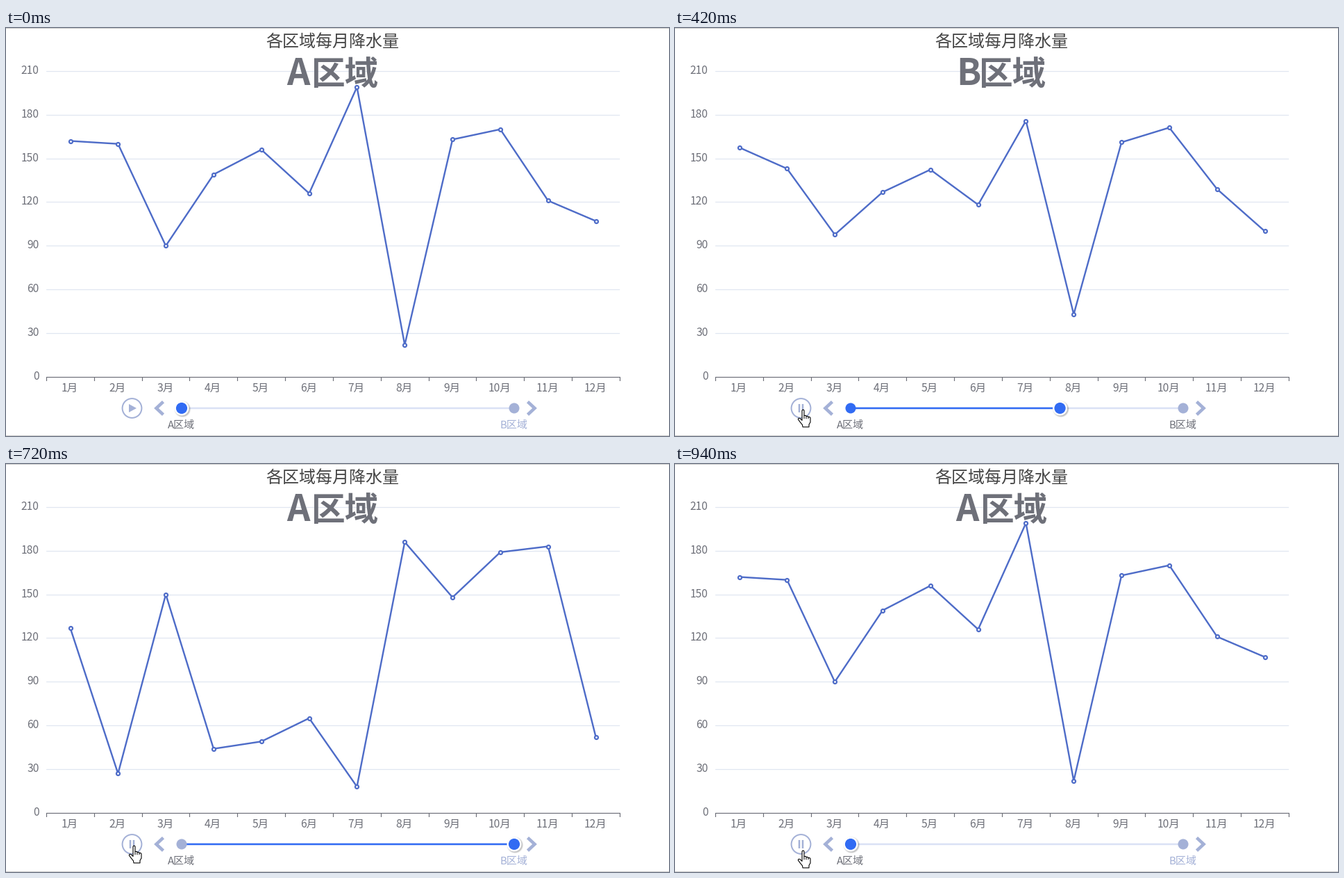
These frames come from a looping animation (955 px wide and 587 px high, 1200 ms). A matplotlib script:

```python
import matplotlib.pyplot as plt
import numpy as np
from matplotlib.animation import FuncAnimation
from matplotlib.patches import Circle, Polygon

W, H = 955, 587
STEP, LOOP = 20, 1200

GREY, TITLE = "#6E7079", "#464646"
LINE, PALE, BLUE, TRACK = "#4E6CC8", "#A4B1D7", "#316BF3", "#DAE1F5"

# Rainfall per month
AREA_A = np.array([162, 160, 90, 139, 156, 126, 199, 22, 163, 170, 121, 107])
AREA_B = np.array([127, 27, 150, 44, 49, 65, 18, 186, 148, 179, 183, 52])

# Times in ms
HAND_IN, PAUSE_AT = 140, 180
TO_B, TO_B_LENGTH = 380, 126
TO_A, TO_A_LENGTH = 720, 118
HAND_DROP, HAND_DROP_END = 880, 940

LEFT, BAND, BASE, UNIT = 58.1, 68.83, 501.9, 2.095
AXIS_ROW = 502.3
SLIDER_Y, STOP_A, STOP_B = 547, 253, 732

plt.rcParams["font.family"] = "Noto Sans CJK JP"
fig = plt.figure(figsize=(W / 72, H / 72), dpi=72, facecolor="white")
ax = fig.add_axes([0, 0, 1, 1])
ax.set_xlim(0, W)
ax.set_ylim(H, 0)
ax.axis("off")


def stroke(points, color, width, z=1, cap="butt", join="miter"):
    x, y = zip(*points)
    return ax.plot(x, y, color=color, lw=width, zorder=z, snap=False,
                   solid_capstyle=cap, solid_joinstyle=join)[0]


def label(x, y, text, size, color=GREY, ha="center", **style):
    return ax.text(x, y, text, fontsize=size, color=color, ha=ha,
                   va="baseline", zorder=2, **style)


def disc(x, y, radius, color, z, **style):
    return ax.add_patch(Circle((x, y), radius, fc=color, lw=0, zorder=z, **style))


def ease_in_out(t, power):
    t = min(max(t, 0), 1)
    if t < 0.5:
        return (2 * t) ** power / 2
    return 1 - (2 - 2 * t) ** power / 2


# Page edges
for y in (0.5, H - 0.5):
    stroke([(0, y), (W, y)], "#CCCCCC", 1)

# Value axis
for k in range(8):
    row = np.floor(AXIS_ROW - 30 * UNIT * k) + 0.5
    if k:
        stroke([(LEFT, row), (884.2, row)], "#E0E6F1", 1.2)
    label(47.5, row + 3.5, str(30 * k), 15.6, ha="right")

# Month axis
stroke([(58, 502.5), (885, 502.5)], GREY, 1.2)
for i in range(13):
    x = np.floor(LEFT + BAND * i + 0.3) + 0.5
    stroke([(x, 502.5), (x, 508)], GREY, 1.2)
months = LEFT + BAND * (np.arange(12) + 0.5)
for i, x in enumerate(months):
    label(x - 0.7, 523, f"{i + 1}月", 15.6)

label(470.5, 27, "各区域每月降水量", 24, TITLE)
big_letter = label(421, 82, "A", 52, weight="bold")
big_area = label(488, 82, "区域", 48.5, weight="bold")

curve, = ax.plot(months, BASE - UNIT * AREA_A, color=LINE, lw=2.4, marker="o",
                 ms=5, mfc="white", mec=LINE, mew=2.2, zorder=3, snap=False,
                 solid_joinstyle="bevel")

# Timeline
stroke([(STOP_A, SLIDER_Y), (STOP_B, SLIDER_Y)], TRACK, 2.5)
progress = stroke([(STOP_A, SLIDER_Y), (STOP_A, SLIDER_Y)], BLUE, 2.5, 2)
dot_a = disc(STOP_A, SLIDER_Y, 7.5, PALE, 3)
disc(STOP_B, SLIDER_Y, 7.5, PALE, 3)
label(STOP_A - 0.5, 576, "A区域", 15)
label_b = label(STOP_B - 0.5, 576, "B区域", 15)
for x, tip in ((226.5, 216.5), (751.5, 761.5)):
    stroke([(x, 537.7), (tip, 547), (x, 556.3)], PALE, 4.6)

# Slider handle: soft shadow, white rim, blue core
handle = [(disc(STOP_A, SLIDER_Y, r, "black", 4, alpha=a), 1.25)
          for r, a in ((12, 0.05), (11.3, 0.08), (10.6, 0.12))]
handle += [(disc(STOP_A, SLIDER_Y, 10.5, "white", 5), 0),
           (disc(STOP_A, SLIDER_Y, 8.1, BLUE, 6), 0)]

# Play and pause button
ax.add_patch(Circle((181.5, 547), 13.9, fill=False, ec=PALE, lw=2))
play = ax.add_patch(Polygon([(177, 541), (177, 553), (188, 547)], fc=PALE, lw=0))
pause = [stroke([(x, 541), (x, 553)], PALE, 2.5) for x in (179, 184)]

# Hand cursor
HAND = np.array([(6, 1.6), (6.6, 0.5), (7.5, 0.2), (8.5, 0.5), (9, 1.6),
                 (9, 8.5), (11.4, 8.5), (12.3, 9.7), (14.2, 9.5), (15.1, 10.7),
                 (17, 10.6), (18, 12), (18, 18), (16, 21.5), (16, 25), (7, 25),
                 (6.5, 22), (3, 17.7), (0.3, 14), (1, 12.4), (3, 12.6), (6, 15.5)])
KNUCKLES = [np.array([(x, top), (x, 13.3)]) for x, top in ((9, 8.5), (12, 9.5), (15, 10.5))]
hand = ax.add_patch(Polygon(HAND, fc="white", ec="black", lw=1.1,
                            joinstyle="round", zorder=8))
knuckles = [stroke(k, "black", 1, 9) for k in KNUCKLES]


def place_hand(t):
    drop = np.clip((t - HAND_DROP) / (HAND_DROP_END - HAND_DROP), 0, 1)
    origin = np.array([177, 549 + 7 * drop])
    hand.set_xy(HAND + origin)
    for line, points in zip(knuckles, KNUCKLES):
        line.set_data(*(points + origin).T)
    for part in (hand, *knuckles):
        part.set_visible(t >= HAND_IN)


def draw(frame):
    t = frame * STEP
    on_b = TO_B <= t < TO_A
    if t < TO_A:
        phase, start, end = (t - TO_B) / TO_B_LENGTH, 0, 1
    else:
        phase, start, end = (t - TO_A) / TO_A_LENGTH, 1, 0

    mix = start + (end - start) * ease_in_out(phase, 3)
    curve.set_ydata(BASE - UNIT * (AREA_A + (AREA_B - AREA_A) * mix))

    # The handle arrives before the curve settles
    slide = start + (end - start) * ease_in_out(phase / 0.6, 5)
    x = STOP_A + (STOP_B - STOP_A) * slide
    progress.set_xdata([STOP_A, x])
    for part, shift in handle:
        part.set_center((x + shift, SLIDER_Y + shift))

    big_letter.set_text("B" if on_b else "A")
    big_letter.set_x(422.5 if on_b else 421)
    big_area.set_x(486 if on_b else 488)
    dot_a.set_facecolor(BLUE if on_b else PALE)
    label_b.set_color(GREY if on_b else PALE)

    playing = t >= PAUSE_AT
    play.set_visible(not playing)
    for bar in pause:
        bar.set_visible(playing)
    place_hand(t)
    return []


anim = FuncAnimation(fig, draw, frames=LOOP // STEP, interval=STEP,
                     repeat=True, repeat_delay=0, blit=False)
plt.show()
```
